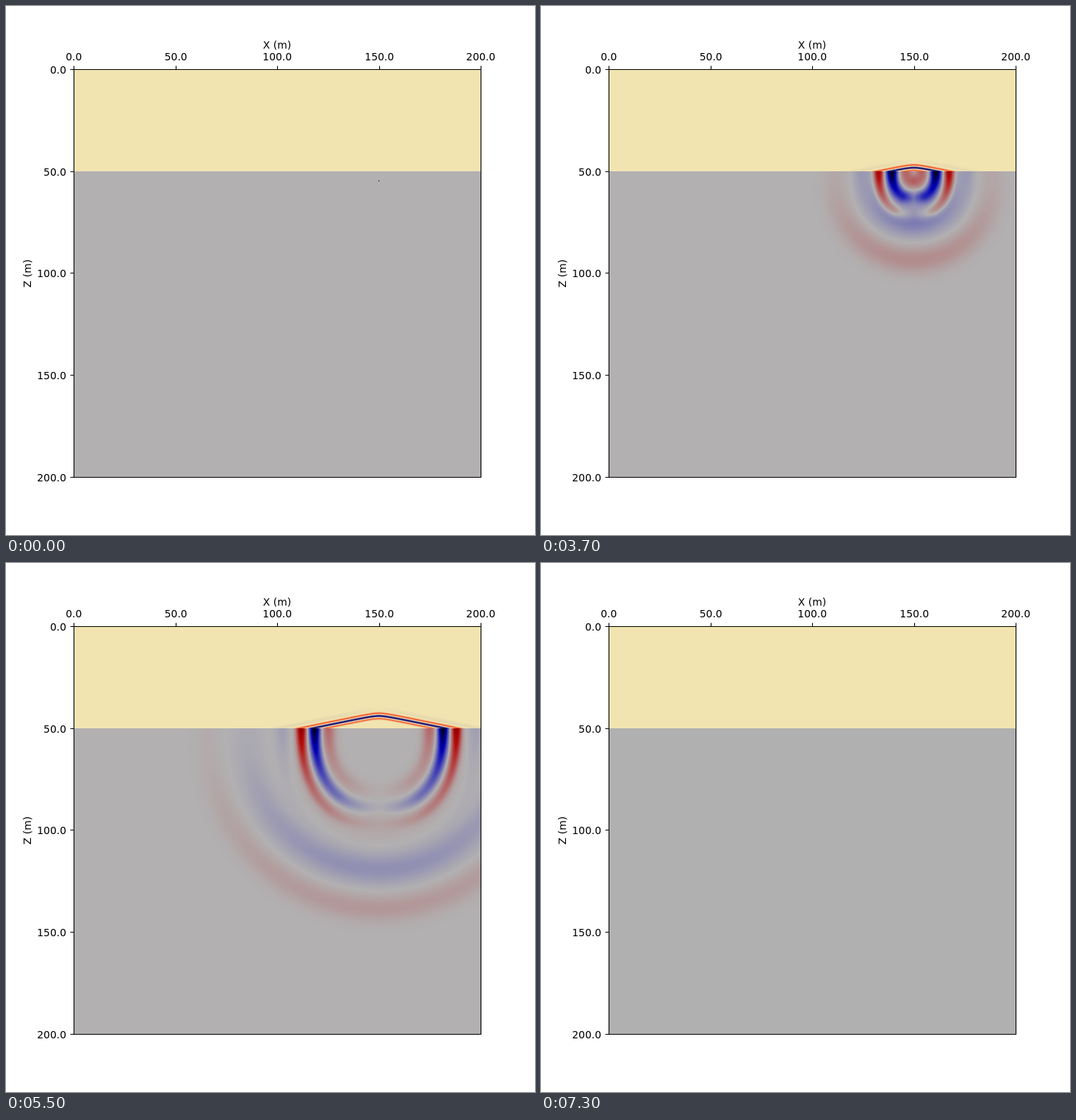
An HTML page with a canvas for the animation above (10000 ms loop, 720x720 px).

```html
<!DOCTYPE html>
<html lang="en">
<head>
<meta charset="utf-8">
<title>Wavefield in two layers</title>
<style>
  html, body { margin: 0; width: 100%; height: 100%; overflow: hidden; background: #fff; }
  canvas, svg { position: absolute; left: 0; top: 0; }
  canvas { left: 92px; top: 86px; }
  text { font: 13.89px "DejaVu Sans", sans-serif; fill: #000; }
  path { fill: none; stroke: #000; stroke-width: 1.1; }
</style>
</head>
<body>
<canvas id="field" width="554" height="555"></canvas>
<svg id="axes" width="720" height="720" viewBox="0 0 720 720">
  <text x="369" y="58" text-anchor="middle">X (m)</text>
  <text transform="translate(34 364) rotate(-90)" text-anchor="middle">Z (m)</text>
</svg>
<script>
const LEFT = 92, TOP = 86, SURFACE = 225, CENTRE = 507.5, SHOT_DEPTH = 13;
const LOOP = 10000, STEP = 50;
const P_SPEED = 69, SURFACE_SPEED = 32, S_SPEED = 40, UPPER_SPEED = 6.6;

const SAND = [241, 228, 176], ROCK = [178, 176, 177], ROCK_END = [176, 176, 176];
const UPPER = { back: SAND, red: [243, 72, 30], darkRed: [205, 40, 15], blue: [50, 42, 140], darkBlue: [30, 22, 95] };
const LOWER = { back: ROCK, red: [180, 12, 12], darkRed: [130, 0, 0], blue: [0, 0, 182], darkBlue: [0, 0, 40] };

const canvas = document.getElementById('field');
const ctx = canvas.getContext('2d');
const { width, height } = canvas;
const image = ctx.createImageData(width, height);
const pixels = image.data.fill(255);

function drawAxes() {
  const svg = document.getElementById('axes');
  let lines = 'M92.5 86.5H646.5V641.5H92.5Z', labels = '';
  for (let i = 0; i <= 4; i++) {
    const x = Math.round(92 + 138.5 * i) + 0.5, y = Math.round(86 + 138.7 * i) + 0.5;
    const value = (50 * i).toFixed(1);
    lines += `M${x} 86.5v-5M92.5 ${y}h-5`;
    labels += `<text x="${x - 0.3}" y="74" text-anchor="middle">${value}</text>` +
              `<text x="82" y="${y + 5}" text-anchor="end">${value}</text>`;
  }
  svg.innerHTML += `<path d="${lines}"/>` + labels;
}

function pulse(time, centre, spread) {
  const x = (time - centre) / spread;
  return x * x > 12 ? 0 : Math.exp(-x * x);
}

// Fast circular wave going down from the shot point.
function bodyWave(d, z, t) {
  const dz = z - SHOT_DEPTH, r = Math.hypot(d, dz), tau = t - r / P_SPEED;
  if (tau < 1.3) return 0;
  const shape = pulse(tau, 2.13, 0.26) - 1.1 * pulse(tau, 2.9, 0.3) + 0.25 * pulse(tau, 3.8, 0.4);
  const downward = 0.1 + 0.9 * Math.pow(Math.max(0, dz / (r + 0.01)), 1.2);
  const beam = 1 - r / (r + 25) * (1 - downward);
  return shape * beam * 1.65 / Math.sqrt(r + 8);
}

// Slower wave, strongest along the interface.
function surfaceWave(d, z, t) {
  const q = Math.pow(Math.pow(d / SURFACE_SPEED, 2.4) + Math.pow(z / S_SPEED, 2.4), 1 / 2.4);
  const tau = t - q;
  if (tau < 0.5) return 0;
  const shape = pulse(tau, 2.2, 0.2) - 1.15 * pulse(tau, 2.77, 0.22) + 0.32 * pulse(tau, 3.35, 0.28)
    - 0.1 * pulse(tau, 1.4, 0.3) * d / (d + 30);
  const side = Math.max(0.2, Math.min(1, (d + 12) / (0.7 * z + 1)));
  return shape * side * Math.exp(-z / (10 * (t + 1)));
}

// Thin, slowly climbing front in the upper layer.
function upperWave(d, h, t) {
  const tau = t - (Math.sqrt(d * d + 100) - 4) / SURFACE_SPEED - h / UPPER_SPEED;
  if (tau < 0.5) return 0;
  return 0.62 * pulse(tau, 2.2, 0.2) - pulse(tau, 2.77, 0.21) + 0.55 * pulse(tau, 3.32, 0.2)
    - 0.06 * pulse(tau, 1.4, 0.4) * d / (d + 30);
}

function setPixel(index, layer, value) {
  const size = Math.abs(value), mix = Math.min(1, size / 0.7);
  const deep = Math.max(0, Math.min(1, (size - 0.7) / 0.35));
  const main = value > 0 ? layer.red : layer.blue;
  const dark = value > 0 ? layer.darkRed : layer.darkBlue;
  for (let c = 0; c < 3; c++) {
    const tint = main[c] + (dark[c] - main[c]) * deep;
    pixels[index + c] = layer.back[c] + (tint - layer.back[c]) * mix;
  }
}

function paint(t) {
  const fade = Math.max(0, Math.min(1, 7 - t));
  const active = t >= 1.2 && fade > 0;
  LOWER.back = fade > 0 ? ROCK : ROCK_END;
  for (let row = 0, index = 0; row < height; row++) {
    const z = row + TOP + 0.5 - SURFACE;
    const layer = z < 0 ? UPPER : LOWER;
    for (let col = 0; col < width; col++, index += 4) {
      let value = 0;
      if (active && z > -50) {
        const d = Math.abs(col + LEFT + 0.5 - CENTRE);
        value = z < 0 ? upperWave(d, -z, t) : bodyWave(d, z, t) + surfaceWave(d, z, t);
      }
      setPixel(index, layer, value * fade);
    }
  }
  ctx.putImageData(image, 0, 0);
  if (t < 0.1) {
    ctx.fillStyle = '#333';
    ctx.fillRect(507 - LEFT, 237 - TOP, 1, 2);
  }
}

const start = performance.now();
let shown = -1;
function tick() {
  const step = Math.floor((performance.now() - start) % LOOP / STEP);
  if (step !== shown) {
    paint(step * STEP / 1000);
    shown = step;
  }
  requestAnimationFrame(tick);
}

drawAxes();
tick();
</script>
</body>
</html>
```
